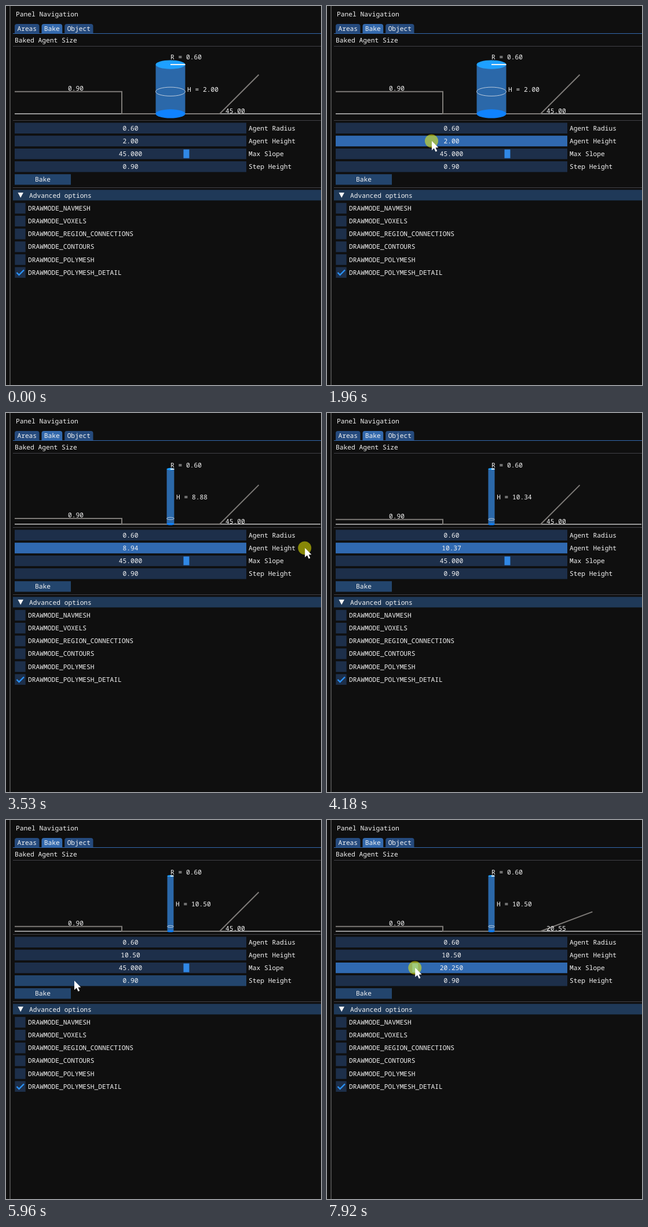
An HTML page with a canvas that plays this animation: 544x654 px, repeating every 7.99 s.

```html
<!DOCTYPE html>
<html lang="en">
<head>
<meta charset="utf-8">
<title>Panel Navigation</title>
<style>
html, body { margin: 0; width: 100%; height: 100%; overflow: hidden; background: #0f0f0f; }
canvas { display: block; }
</style>
</head>
<body>
<canvas id="stage" width="544" height="654"></canvas>
<script>
const ctx = document.getElementById('stage').getContext('2d');
const LOOP = 7990, LAG = 14;
const FRAME = '#1d2f4a', HOVER = '#23456d', ACTIVE = '#3069b0', ACCENT = '#4296fa';
const GREY = '#7d7a77', WHITE = '#f4f4f4';

// Widget rows share one pitch and height; rows may be fractional
const PITCH = 22.15, ROW = 18.4;
const mid = row => 210.8 + row * PITCH;

// Pointer position that belongs to a value, and back
const heightX = v => 181 + (v - 2) / 0.0207, heightOf = x => 2 + (x - 181) * 0.0207;
const slopeX = v => 22 + v / 60 * 386, slopeOf = x => (x - 22) / 386 * 60;

// Moves: from, until, x, row; the pointer rests in between
const moves = [
  [190, 580, 180, 0],
  [580, 940, 150, 3.7],
  [1280, 1640, heightX(2), 1],
  [1960, 2600, heightX(4.9), 1.1],
  [2600, 3530, heightX(8.94), 1],
  [3530, 4240, heightX(10.5), 1],
  [4480, 4810, 135, 3.6],
  [4810, 5250, 60, 3.85],
  [5760, 5960, 118, 3],
  [5960, 6610, slopeX(45), 2],
  [6680, 7450, slopeX(25), 2],
  [7700, 7920, slopeX(20.25), 2]
];

const within = (v, a, b) => v >= a && v < b;

function pointer(t) {
  let x = 160, row = t < 190 ? 24 : 14.6;
  for (const [from, until, toX, toRow] of moves) {
    if (t < from) break;
    if (from === 4480) [x, row] = [436, 2.3];   // comes back in after the release outside
    const f = Math.min(1, (t - from) / (until - from));
    x += (toX - x) * f;
    row += (toRow - row) * f;
  }
  return { x, y: mid(row) };
}

const heightAt = t => t < 1960 ? 2 : heightOf(pointer(Math.min(t, 4300)).x);
const slopeAt = t => t < 6670 ? 45 : slopeOf(pointer(t).x);

function text(str, x, y, align = 'left') {
  ctx.textAlign = align;
  ctx.fillStyle = WHITE;
  ctx.fillText(str, x, Math.round(y + 4));
}

function box(x, y, w, h, color, radius = 0) {
  ctx.fillStyle = color;
  ctx.beginPath();
  ctx.roundRect(x, y, w, h, radius);
  ctx.fill();
}

const bar = (x, row, w, color) => box(x, mid(row) - ROW / 2, w, ROW, color);

function line(points, color, width) {
  ctx.strokeStyle = color;
  ctx.lineWidth = width;
  ctx.beginPath();
  points.forEach(p => ctx.lineTo(...p));
  ctx.stroke();
}

function shape(points, color) {
  ctx.fillStyle = color;
  ctx.beginPath();
  points.forEach(p => ctx.lineTo(...p));
  ctx.fill();
}

function oval(x, y, rx, ry, color) {
  ctx.fillStyle = color;
  ctx.beginPath();
  ctx.ellipse(x, y, rx, ry, 0, 0, 7);
  ctx.fill();
}

function drawPanel() {
  box(0, 0, 544, 654, '#0f0f0f');
  box(6, 0, 2, 654, '#484848');
  text('Panel Navigation', 17, 14);
  let x = 15;
  for (const name of ['Areas', 'Bake', 'Object']) {
    const w = 8.5 + name.length * 6.8;
    box(x, 31, w, 17, name === 'Bake' ? '#3369ad' : '#254a7d', [4, 4, 0, 0]);
    text(name, x + w / 2, 39.4, 'center');
    x += w + 4;
  }
  box(12, 47, 532, 1, '#3369ad');
  text('Baked Agent Size', 15, 59);
  [69, 197, 313].forEach(y => box(12, y, 532, 1, '#414146'));

  bar(12, 5.22, 532, '#1f3958');
  shape([[20.5, 322], [30, 322], [25.2, 331]], WHITE);
  text('Advanced options', 40, 327);
  ['NAVMESH', 'VOXELS', 'REGION_CONNECTIONS', 'CONTOURS', 'POLYMESH', 'POLYMESH_DETAIL'].forEach((mode, i) => {
    const row = 6.24 + i;
    bar(15.3, row, ROW, FRAME);
    text('DRAWMODE_' + mode, 38, mid(row));
  });
  line([[18.5, 460], [22.5, 464], [31, 455.5]], '#2a92fa', 2.4);
}

// The whole figure is scaled so that the agent always fills the view
function drawAgent(height, slope) {
  const scale = 98.3 / (height + 0.315);
  const ground = 193.6 - 0.18 * scale, step = ground - 0.9 * scale;
  const top = 95.3 + 0.135 * scale, cx = 284;
  const rx = 0.6 * scale, ry = 0.3 * rx;
  const a = slope * Math.PI / 180;

  line([[15, ground], [543, ground]], '#c4c4c4', 1.4);
  line([[15, step], [200, step], [200, ground], [369, ground],
    [369 + 95.5 * Math.cos(a), ground - 95.5 * Math.sin(a)]], GREY, 2);

  box(cx - rx, top, 2 * rx, ground - top, '#2b68a9');
  oval(cx, ground, rx, ry, '#0f82ff');
  oval(cx, top, rx, ry, '#1ea0ff');
  oval(cx, step, rx, ry, 'transparent');
  ctx.strokeStyle = '#bccbdc';
  ctx.lineWidth = 1;
  ctx.stroke();
  line([[cx, top], [cx + rx, top]], WHITE, 2);

  text('R = 0.60', cx, 90.4 - 0.057 * scale);
  text('H = ' + height.toFixed(2), cx + rx + 3.6, (top + ground) / 2 + 0.7);
  text('0.90', 107, step - 5.8);
  text(slope.toFixed(2), 379, ground - 5);
}

function drawControls(t, p) {
  const slope = slopeAt(t);
  const held = within(t, 1960, 4300) ? 1 : t >= 6670 ? 2 : -1;
  const over = (row, w) => held < 0 && within(p.x, 15, 15 + w) && Math.abs(p.y - mid(row)) < ROW / 2;
  const rows = [
    ['Agent Radius', '0.60'],
    ['Agent Height', heightAt(t).toFixed(2)],
    ['Max Slope', slope.toFixed(3)],
    ['Step Height', '0.90']
  ];
  rows.forEach(([label, value], i) => {
    bar(15, i, 400, held === i ? ACTIVE : over(i, 400) ? HOVER : FRAME);
    if (i === 2) box(slopeX(slope) - 5, mid(i) - 7.5, 10, 15, held === i ? ACCENT : '#3088e6');
    text(value, 215, mid(i), 'center');
    text(label, 419, mid(i));
  });

  bar(15, 4, 97, within(t, 5320, 5450) ? '#0f87fa' : over(4, 97) ? ACCENT : HOVER);
  text('Bake', 63.5, mid(4), 'center');
}

function drawPointer(t, { x, y }) {
  const pressed = within(t, 1960, 4300) || within(t, 5320, 5450) || t >= 6670;
  if (pressed) oval(x - 0.5, y, 11.5, 11.5, 'rgba(255,255,0,.5)');
  const arrow = [[0, 0], [0, 16], [3.8, 12.6], [6.6, 18.6], [9.2, 17.4], [6.5, 11.6], [11.3, 11.4]];
  shape(arrow.map(([dx, dy]) => [x + dx, y + dy]), '#fff');
}

let start;
function tick(now) {
  start ??= now;
  const t = Math.max(0, now - start) % LOOP, p = pointer(t);
  ctx.font = '11.24px "Noto Sans Mono", "DejaVu Sans Mono", monospace';
  ctx.textRendering = 'geometricPrecision';
  drawPanel();
  drawAgent(heightAt(t - LAG), slopeAt(t - LAG));
  drawControls(t, p);
  drawPointer(t, p);
  requestAnimationFrame(tick);
}
requestAnimationFrame(tick);
</script>
</body>
</html>
```
